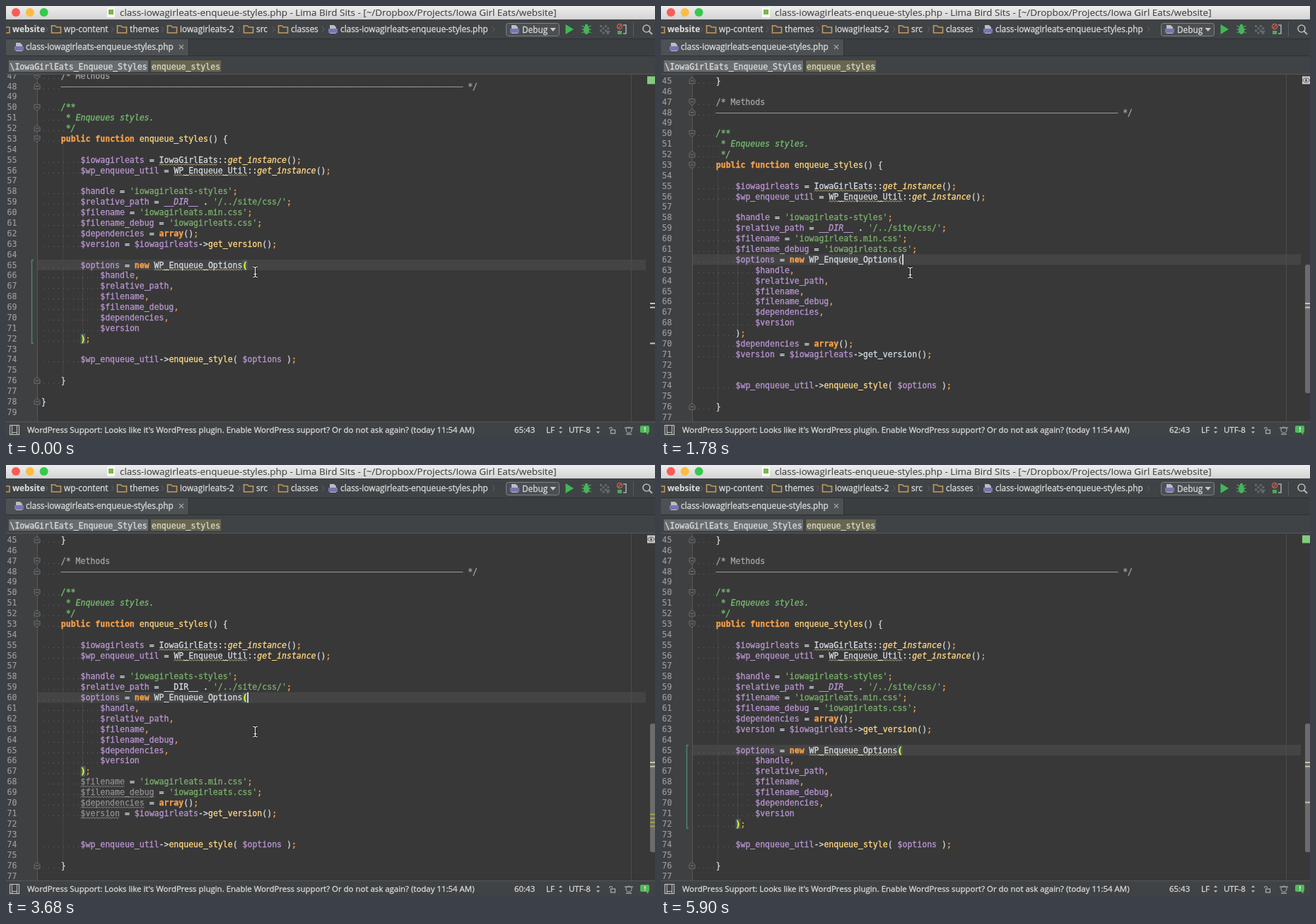
Recreate the animation shown at these times as an HTML page with a canvas. Size 918 by 610 pixels, loop 6080 ms.

```html
<!DOCTYPE html>
<html lang="en">
<head>
<meta charset="utf-8">
<title>Moving a statement</title>
<style>
html, body { margin: 0; width: 100%; height: 100%; overflow: hidden; background: #383838; }
canvas { display: block; }
</style>
</head>
<body>
<canvas id="stage" width="918" height="610"></canvas>
<script>
const ctx = document.getElementById('stage').getContext('2d');
const LOOP = 6080, CHAR = 6.94, LINE = 14.88, LEFT = 50, FIRST = 45;
const MONO = '11.53px "DejaVu Sans Mono", monospace';
const UI = '11.83px "Open Sans", sans-serif';
const SMALL = '11.45px "Open Sans", sans-serif';
const C = {
  editor: '#383838', panel: '#404345', gutter: '#3e4042', rule: '#555759', text: '#d3dae1',
  key: '#f7a049', fn: '#ffd782', variable: '#b996d2', string: '#7bb06c', doc: '#76bd70',
  comment: '#a3a3a3', unused: '#8f8f8f', wave: '#b8ac7c', red: '#d9565a', ui: '#dadada'
};

// start time, first line of the block, analysis mode, line in the status bar
const steps = [
  [0, 65, 'ok'], [1190, 64, 'up'], [1340, 64, 'wait'], [1630, 63, 'up'], [1780, 62, 'up'],
  [1920, 61, 'up'], [2070, 60, 'up'], [2210, 59, 'up'], [2360, 58, 'up'], [2500, 58, 'wait'],
  [2800, 58, 'err'], [3240, 59, 'down'], [3680, 60, 'down'], [3830, 61, 'down'],
  [3970, 62, 'down'], [4120, 63, 'down'], [4270, 63, 'down', 64], [4420, 64, 'down'],
  [4560, 65, 'down'], [5010, 65, 'ok']
];

const head = ['    }', '', '    /* Methods', '    ' + '–'.repeat(82) + ' */', '', '    /**',
  '     * Enqueues styles.', '     */', '    public function enqueue_styles() {', '',
  '        $iowagirleats = IowaGirlEats::get_instance();',
  '        $wp_enqueue_util = WP_Enqueue_Util::get_instance();', ''];
const assigns = ["$handle = 'iowagirleats-styles';", "$relative_path = __DIR__ . '/../site/css/';",
  "$filename = 'iowagirleats.min.css';", "$filename_debug = 'iowagirleats.css';",
  '$dependencies = array();', '$version = $iowagirleats->get_version();', ''];
const args = ['$handle,', '$relative_path,', '$filename,', '$filename_debug,', '$dependencies,', '$version'];
const tail = ['', '        $wp_enqueue_util->enqueue_style( $options );', '', '    }', '', '}', ''];
const TOKEN = /(\$\w+|'[^']*'|\b(?:public|function|new|array)\b|get_instance|get_version|__DIR__|WP_Enqueue_\w+|IowaGirlEats|enqueue_styles?|[;,])/;

function rect(x, y, w, h, color) { ctx.fillStyle = color; ctx.fillRect(x, y, w, h); }
// A hairline outline gives light text its smoothed, heavier look.
function text(s, x, y, font = UI, color = C.ui, weight = 0.3) {
  ctx.font = font; ctx.fillStyle = ctx.strokeStyle = color; ctx.lineWidth = weight;
  ctx.fillText(s, x, y + 4);
  ctx.strokeText(s, x, y + 4);
}
function path(points, color, width = 1, fill = false) {
  ctx.beginPath();
  points.forEach(([x, y]) => ctx.lineTo(x, y));
  if (fill) { ctx.fillStyle = color; ctx.fill(); return; }
  ctx.strokeStyle = color; ctx.lineWidth = width; ctx.stroke();
}
function disc(x, y, r, color, width) {
  ctx.beginPath(); ctx.arc(x, y, r, 0, 7);
  if (width) { ctx.strokeStyle = color; ctx.lineWidth = width; ctx.stroke(); }
  else { ctx.fillStyle = color; ctx.fill(); }
}
function wave(x1, x2, y, color) {
  const points = [];
  for (let x = x1, i = 0; x <= x2; x += 2, i++) points.push([x, y + (i % 2 ? 6 : 7.5)]);
  path(points, color);
}
function folder(x, y = 33) {
  path([[x, y - 5], [x + 5, y - 5], [x + 7, y - 3], [x + 13, y - 3], [x + 13, y + 5], [x, y + 5], [x, y - 6]], '#c39a5c', 1.6);
}
function fileIcon(x, y) {
  path([[x + 2, y - 6], [x + 8, y - 6], [x + 11, y - 3], [x + 11, y + 6], [x + 2, y + 6]], '#b9bec4', 1, true);
  rect(x, y - 1, 13, 6, '#7a74b4');
}
function chevron(x) { path([[x, 29], [x + 3, 33], [x, 37]], '#606365'); }

function buildRows(start, mode) {
  const at = start - 58, rows = head.map(s => ({ s }));
  const moved = assigns.map((s, i) => {
    const after = i >= at;
    return {
      s: s && '        ' + s,
      stale: mode === 'down' ? !after : (mode === 'up' || mode === 'wait') && after,
      unused: after && (mode === 'down' || mode === 'err')
    };
  });
  const block = [{ s: '        $options = new WP_Enqueue_Options(', open: true },
    ...args.map(s => ({ s: '            ' + s, arg: true })), { s: '        );', close: true }];
  moved.splice(at, 0, ...block);
  return rows.concat(moved, tail.map(s => ({ s })));
}

function drawToken(tok, col, y, row, mode, mark) {
  const x = LEFT + col * CHAR, end = x + tok.length * CHAR;
  let color = C.text, style = '';
  const underline = c => { wave(x, end, y, c); mark(c); };
  if (tok[0] === '$') {
    color = C.variable;
    if (row.unused && col === 8) { color = C.unused; underline(C.unused); }
    if (row.arg && mode === 'err') underline(C.red);
  } else if (tok[0] === "'") color = C.string;
  else if (/^(public|function|new|array)$/.test(tok)) { color = C.key; style = 'bold '; }
  else if (/^[;,]$/.test(tok)) color = C.key;
  else if (tok === 'get_instance') { color = C.fn; style = 'italic '; }
  else if (tok === '__DIR__') { if (!row.stale) { color = C.variable; style = 'italic '; } }
  else if (/^enqueue_|^get_version/.test(tok)) { if (!row.stale) color = C.fn; }
  else if (/^WP_|^Iowa/.test(tok) && (!row.open || mode === 'ok' || mode === 'err')) underline(C.wave);
  text(tok, x, y, style + MONO, color);
}

function drawRow(row, n, y, mode, marks) {
  const { s } = row, indent = s.search(/\S/);
  if (n > 53 && n < 76) rect(80, y - 7.5, 1, 15, '#474747');
  if (row.arg) rect(108, y - 7.5, 1, 15, '#474747');
  for (let i = 0; i < indent; i++) rect(Math.round(LEFT + i * CHAR + 3), Math.round(y + 3), 1, 1, '#686868');
  text(String(n), 1.5, y, MONO, '#9b9d9f', 0.15);
  if (n >= 47 && n <= 52) {
    const doc = n >= 50;
    text(s, LEFT, y, (doc ? 'italic ' : '') + MONO, doc ? C.doc : C.comment);
    return;
  }
  let col = 0;
  s.split(TOKEN).forEach(tok => {
    const lead = tok.length - tok.trimStart().length;
    if (tok.trim()) drawToken(tok.trim(), col + lead, y, row, mode, c => marks.push([n, c]));
    col += tok.length;
  });
  if ((row.open || row.close) && mode !== 'up') {
    const x = LEFT + (row.open ? 41 : 8) * CHAR;
    rect(x, y - 7, CHAR, 14.5, '#46605a');
    text(row.open ? '(' : ')', x, y, 'bold ' + MONO, '#fff03a');
  }
}

function foldMark(n, y) {
  const d = [47, 50, 53].includes(n) ? 1 : -1;
  const shape = [[40, y - 4 * d], [48, y - 4 * d], [48, y + 1.5 * d], [44, y + 5 * d], [40, y + 1.5 * d], [40, y - 4 * d]];
  path(shape, C.gutter, 1, true);
  path(shape, '#6c6e70');
  path([[42, y], [46, y]], '#7c7e80');
}

function drawEditor(t, start, mode) {
  const scroll = t < 1190 ? -37 : 0, marks = [];
  const lineY = n => 105.9 + (n - FIRST) * LINE + scroll;
  ctx.save();
  ctx.beginPath(); ctx.rect(0, 97, 918, 491); ctx.clip();
  rect(0, 97, 918, 491, C.editor);
  rect(0, 97, 44, 491, C.gutter);
  rect(44, 97, 1, 491, C.rule);
  rect(45, lineY(start) - 7.5, 860, 15, '#444444');
  rect(884, 97, 1, 491, '#4b4b4b');
  buildRows(start, mode).forEach((row, i) => drawRow(row, FIRST + i, lineY(FIRST + i), mode, marks));
  [45, 47, 48, 50, 52, 53, 76, 78].forEach(n => foldMark(n, lineY(n)));
  if (mode === 'ok') {
    const top = lineY(start) - 7, bottom = lineY(start + 7) + 6.5;
    path([[39, top], [36.5, top], [36.5, bottom], [39, bottom]], '#4f8273', 1.5);
  }
  if (t >= 450 && t < 890 || t >= 1190 && t < 5900) rect(341.3, lineY(start) - 7.5, 1.6, 15, '#f2f2f2');

  if (t >= 1190) {
    ctx.fillStyle = '#6c6c6c';
    ctx.beginPath(); ctx.roundRect(911, 366, 8, 182, 3); ctx.fill();
  }
  const stripe = { [C.wave]: '#c9c4ac', [C.red]: '#c46c6f', [C.unused]: '#a5a052' };
  marks.forEach(([n, c]) => rect(911, 420 + (n - 55) * 5.65, 7, 2, stripe[c]));
  const done = { ok: '#82cc7c', err: '#eda3a5' }[mode];
  rect(907, 99.5, 11, 11, done || '#c9c9c9');
  if (!done) {
    ctx.beginPath(); ctx.ellipse(912.5, 105, 4.5, 2.8, 0, 0, 7);
    ctx.strokeStyle = '#555'; ctx.lineWidth = 1; ctx.stroke();
    disc(912.5, 105, 1.5, '#444');
  }
  ctx.restore();
}

function drawTop() {
  const g = ctx.createLinearGradient(0, 0, 0, 19);
  g.addColorStop(0, '#ededed'); g.addColorStop(1, '#d4d4d4');
  rect(0, 0, 918, 19, g);
  ['#fc5b57', '#fdbc40', '#35c94b'].forEach((c, i) => disc(14 + i * 19.8, 9, 6, c));
  rect(143, 2, 11, 14, '#fafafa');
  rect(145, 5, 7, 7, '#79b64a');
  text('class-iowagirleats-enqueue-styles.php - Lima Bird Sits - [~/Dropbox/Projects/Iowa Girl Eats/website]',
    161, 9.5, '13.43px "Open Sans", sans-serif', '#424242', 0.1);

  rect(0, 19, 918, 78, C.panel);
  rect(0, 46, 918, 1, '#2e3032');
  rect(0, 47, 918, 23, '#3b3e40');
  rect(0, 47, 258, 23, '#4e5153');
  rect(258, 47, 1, 23, '#2e3032');
  rect(0, 70, 918, 1, '#2e3032');
  rect(0, 96, 918, 1, '#55585a');

  folder(-8);
  text('website', 9, 33, 'bold ' + UI, C.ui, 0.1);
  [['wp-content', 82], ['themes', 175], ['iowagirleats-2', 246], ['src', 354], ['classes', 403]].forEach(([s, x]) => {
    chevron(x - 26); folder(x - 17.5); text(s, x, 33);
  });
  chevron(447); fileIcon(456, 33);
  text('class-iowagirleats-enqueue-styles.php', 473, 33);
  chevron(688);

  ctx.beginPath(); ctx.roundRect(707.5, 24.5, 75, 18, 3);
  ctx.fillStyle = '#4c4f51'; ctx.fill();
  ctx.strokeStyle = '#7f8284'; ctx.lineWidth = 1; ctx.stroke();
  fileIcon(713, 33);
  text('Debug', 730, 33.5);
  path([[769.5, 31], [778, 31], [773.7, 36]], '#c8c8c8', 1, true);
  path([[791.5, 26], [803, 33], [791.5, 40]], '#3dba55', 1, true);
  bug(821, '#46b45a');
  for (let i = 0; i < 16; i++)
    if ((i + (i >> 2)) % 2 === 0) rect(840 + (i % 4) * 3.4, 27 + (i >> 2) * 3.2, 3, 3, '#66696b');
  path([[848, 35], [855, 35], [851, 41]], '#66696b', 1, true);
  disc(868, 29, 3.5, '#c45c52', 1.5);
  path([[865.5, 31.5], [870.5, 26.5]], '#c45c52', 1.3);
  path([[873, 27], [877, 27], [877, 39], [873, 39]], '#a8abad', 1.6);
  rect(865, 35, 6, 5, '#4ca75c');
  rect(887, 23, 1, 20, '#5c5f61');
  disc(906, 32, 5, '#b8b8b8', 1.6);
  path([[909.5, 35.5], [914, 40]], '#b8b8b8', 2);

  fileIcon(12, 58);
  text('class-iowagirleats-enqueue-styles.php', 28, 58);
  path([[245, 55], [251, 61]], '#a0a2a4', 1.2);
  path([[251, 55], [245, 61]], '#a0a2a4', 1.2);
  rect(4, 77, 197, 16, '#696c6e');
  rect(205, 77, 99, 16, '#68664f');
  text('\\IowaGirlEats_Enqueue_Styles', 5.5, 85.5, MONO, '#dadcde');
  text('enqueue_styles', 206, 85.5, MONO, '#d8d8c8');
}

function bug(x, color) {
  for (let i = -1; i < 2; i++) path([[x - 6.5, 33 + i * 5], [x, 33 + i * 2], [x + 6.5, 33 + i * 5]], color, 1.3);
  ctx.beginPath(); ctx.ellipse(x, 34, 4, 6, 0, 0, 7);
  ctx.fillStyle = color; ctx.fill();
  disc(x, 28, 2.3, color);
}

function updown(x) {
  path([[x, 598], [x + 2.5, 595], [x + 5, 598]], '#b8b8b8', 1, true);
  path([[x, 602], [x + 2.5, 605], [x + 5, 602]], '#b8b8b8', 1, true);
}

function drawStatus(line) {
  rect(0, 588, 918, 22, C.panel);
  rect(0, 588, 918, 1, '#55585a');
  ctx.strokeStyle = '#bcbcbc'; ctx.lineWidth = 1.2;
  ctx.strokeRect(5.5, 593.5, 13, 13);
  path([[8.5, 594], [8.5, 606]], '#bcbcbc');
  path([[15.5, 594], [15.5, 606]], '#bcbcbc');
  path([[8.5, 603.5], [15.5, 603.5]], '#bcbcbc');
  text("WordPress Support: Looks like it's WordPress plugin. Enable WordPress support? Or do not ask again? (today 11:54 AM)", 30, 600, SMALL);
  text(line + ':43', 719, 600, SMALL);
  text('LF', 764, 600, SMALL); updown(782);
  text('UTF-8', 796, 600, SMALL); updown(835);
  ctx.strokeStyle = '#b0b0b0'; ctx.lineWidth = 1.2;
  ctx.strokeRect(855.5, 600, 6, 5);
  ctx.beginPath(); ctx.arc(855.5, 598.5, 2, Math.PI, 0); ctx.stroke();
  disc(881, 600, 4, '#9c9ea0', 1.2);
  path([[875, 597], [887, 597]], '#9c9ea0', 1.5);
  path([[877, 606], [885, 606]], '#9c9ea0', 1.5);
  ctx.beginPath(); ctx.roundRect(897, 594, 13, 10, 2);
  ctx.fillStyle = '#4fb85a'; ctx.fill();
  path([[905, 603], [909, 603], [908, 607]], '#4fb85a', 1, true);
  rect(903, 596, 1.5, 4, '#eee'); rect(903, 601, 1.5, 1.5, '#eee');
}

function drawPointer(t) {
  if (t >= 5460) return;
  const [x, y] = t < 150 ? [352.5, 376.5] : t < 5310 ? [352.5, 377.5] : [893.5, 539.5];
  [['#161616', 3], ['#f4f4f4', 1.1]].forEach(([color, width]) => {
    path([[x - 3.5, y - 7.5], [x - 1, y - 7], [x, y - 6], [x, y + 6], [x - 1, y + 7], [x - 3.5, y + 7.5]], color, width);
    path([[x + 3.5, y - 7.5], [x + 1, y - 7], [x, y - 6], [x, y + 6], [x + 1, y + 7], [x + 3.5, y + 7.5]], color, width);
    path([[x - 2, y + 3], [x + 2, y + 3]], color, width);
  });
}

function frame() {
  const t = performance.now() % LOOP;
  const [, start, mode, line = start] = steps.findLast(s => s[0] <= t);
  drawEditor(t, start, mode);
  drawTop();
  drawStatus(line);
  drawPointer(t);
  requestAnimationFrame(frame);
}
frame();
</script>
</body>
</html>
```
